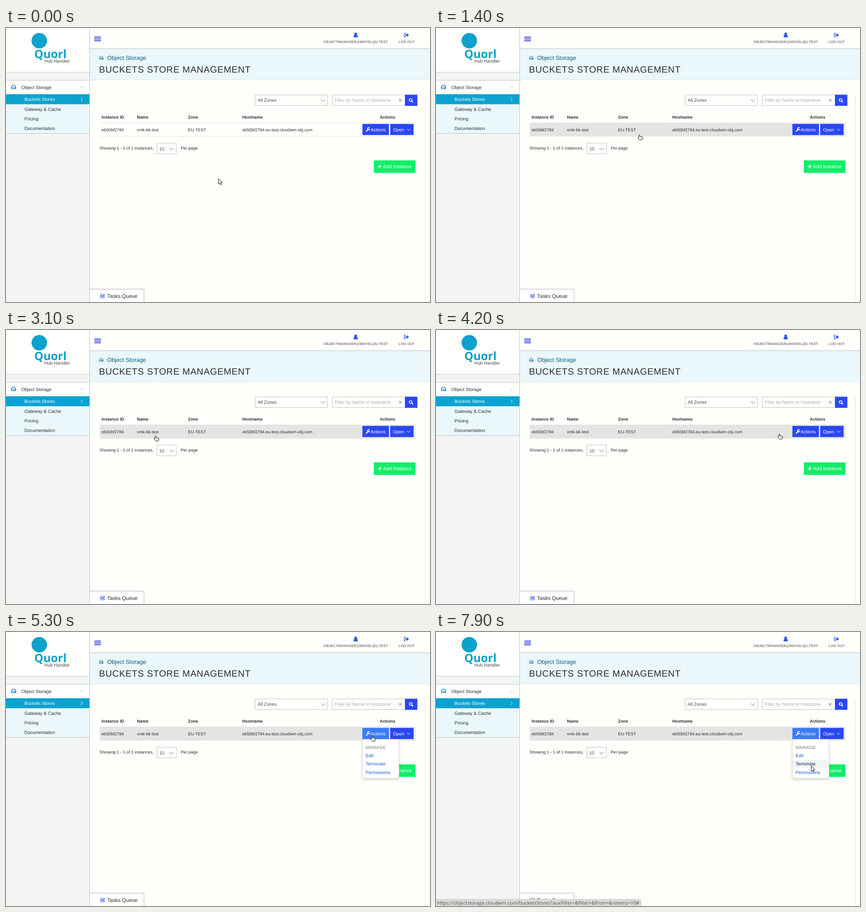
Write an HTML page that moves like this. It is 930 by 602 pixels and loops after 8 s.

```html
<!DOCTYPE html>
<html lang="en">
<head>
<meta charset="utf-8">
<title>Buckets store management</title>
<style>
html, body { margin: 0; width: 100%; height: 100%; overflow: hidden; background: #fffffc; }
svg { display: block; width: 930px; height: 602px; }
text { font: 9.96px "Liberation Sans", Arial, sans-serif; fill: #2b2d31; text-rendering: geometricPrecision; white-space: pre; }
.cell text { font-size: 9.24px; }
.b, .cell text.b { font-weight: bold; }
.top text { font-size: 7.82px; font-weight: bold; fill: #7b7c80; text-anchor: middle; }
text.w { fill: #fff; }
.line { fill: none; stroke: #bcbfc2; }
.soft { fill: none; stroke: #e0e3e3; }
.chev { fill: none; stroke: #4d68c4; stroke-width: 1; }
.menu text { fill: #1f55d0; }
.blue { fill: #2b47f4; }
.icon { fill: #2a55ea; }
</style>
</head>
<body>
<svg viewBox="0 0 930 602">
  <defs>
    <filter id="shadow" x="-20%" y="-20%" width="140%" height="140%">
      <feDropShadow dx="0" dy="3" stdDeviation="3" flood-opacity=".17"/>
    </filter>
    <g id="disk" fill="none" stroke-width="1.2">
      <path d="M.6 5L2.4 1.2Q2.6.6 3.3.6H7.7Q8.4.6 8.6 1.2L10.4 5V8.4H.6ZM.6 5H10.4M6.2 6.8H7.3M8.2 6.8H9.3"/>
    </g>
  </defs>
  <rect width="930" height="602" fill="#fffffc"/>

  <!-- sidebar -->
  <rect width="183" height="602" fill="#f3f5f4"/>
  <rect width="183" height="97" fill="#fffffe"/>
  <circle cx="73" cy="28" r="17" fill="#0ba2cb"/>
  <text x="62" y="66" style="font:bold 25px 'Open Sans',sans-serif;fill:#0b9fc9">Quorl</text>
  <text x="84" y="75.5" style="font-size:10px;fill:#45484c">Hub Handler</text>
  <rect y="115" width="183" height="31" fill="#fffffd"/>
  <rect y="146" width="183" height="85" fill="#eaf8fc"/>
  <rect y="145.5" width="183.5" height="22" fill="#0ca2d0"/>
  <path class="line" d="M0 97.2H183M0 115H183M0 231.7H183M183.5 0V602"/>
  <use href="#disk" x="11" y="125" stroke="#136fb0"/>
  <text x="33.5" y="133.8">Object Storage</text>
  <path class="chev" style="stroke:#bcc3c6" d="M162 128L166 132L170 128"/>
  <text class="w" x="40.5" y="160.2">Buckets Stores</text>
  <path class="chev" style="stroke:#fff" d="M164 153L167.5 156.7L164 160.4"/>
  <text x="40.5" y="181.6">Gateway &amp; Cache</text>
  <text x="40.5" y="203">Pricing</text>
  <text x="40.5" y="224.3">Documentation</text>

  <!-- top bar -->
  <path d="M193.7 20H208.2M193.7 24H208.2M193.7 28H208.2" stroke="#2a40d6" stroke-width="2"/>
  <g class="top">
    <path class="icon" d="M762.5 20.5V18Q762.7 15.2 765 15H769Q771.3 15.2 771.5 18V20.5Z"/>
    <circle class="icon" cx="767" cy="13" r="3"/>
    <path d="M877 11.5H874.5Q873.5 11.5 873.5 12.5V18.5Q873.5 19.5 874.5 19.5H877" fill="none" stroke="#2a55ea" stroke-width="1.3"/>
    <path class="icon" d="M876 14H879.3V11.3L883.8 15.5L879.3 19.7V17H876Z"/>
    <text x="767" y="33.3">OBJECTMANAGER@MOVELQU.TEST</text>
    <text x="878.7" y="33.3">LOG OUT</text>
  </g>
  <rect x="184" y="46" width="746" height="68" fill="#eaf7fb"/>
  <path class="line" d="M184 45.5H930"/>
  <path class="soft" d="M184 114H930M919.5 147V602"/>
  <use href="#disk" transform="translate(204.5 62) scale(.82)" stroke="#0b6088"/>
  <text x="222" y="69.8" style="font-size:12.8px;fill:#0b5c84">Object Storage</text>
  <text x="204" y="97.6" style="font-size:19.9px;letter-spacing:.711px">BUCKETS STORE MANAGEMENT</text>

  <!-- filters -->
  <path class="line" d="M546.5 147H705.5V170.5H546.5ZM875 147H715.5V170.5H875"/>
  <text x="552" y="162.3" style="fill:#4a4c50">All Zones</text>
  <path class="chev" d="M691 157L695.3 161.5L699.6 157"/>
  <text x="721" y="162.3" style="fill:#a9abad">Filter by Name or hostname</text>
  <path d="M862 156L867.6 161.6M867.6 156L862 161.6" stroke="#888" stroke-width="1.1"/>
  <rect class="blue" x="875" y="146.5" width="27.3" height="24.5"/>
  <path d="M889.6 160.2L892.6 163.2" stroke="#fff" stroke-width="2"/>
  <circle cx="887.6" cy="158.2" r="3" fill="none" stroke="#fff" stroke-width="1.6"/>

  <!-- table -->
  <rect id="row" x="205.5" y="209" width="692.5" height="29" fill="#e4e5e3"/>
  <path class="soft" d="M205 208.5H898M205 238H898"/>
  <g class="cell">
    <text class="b" x="209.7" y="198.7">Instance ID</text>
    <text class="b" x="287.3" y="198.7">Name</text>
    <text class="b" x="399.3" y="198.7">Zone</text>
    <text class="b" x="518.2" y="198.7">Hostname</text>
    <text class="b" x="820" y="198.7">Actions</text>
    <text x="209.7" y="226.5">eb50bf2784</text>
    <text x="287.3" y="226.5">vmk-bk-test</text>
    <text x="399.3" y="226.5">EU-TEST</text>
    <text x="518.2" y="226.5">eb50bf2784.eu-test.cloudwm-obj.com</text>
    <text x="205" y="267">Showing 1 - 1 of 1 instances,</text>
    <text x="383.2" y="267">Per page</text>
  </g>
  <rect id="actions" x="781.7" y="210.7" width="58.2" height="24.5"/>
  <path d="M790.2 227L794.7 222.5" stroke="#fff" stroke-width="2.2" stroke-linecap="round"/>
  <path d="M797.4 219.6A2.5 2.5 0 1 0 798 221.8" fill="none" stroke="#fff" stroke-width="1.9"/>
  <text class="w" x="800" y="226.5">Actions</text>
  <rect class="blue" x="842.7" y="210.7" width="51.3" height="24.5"/>
  <text class="w" x="849" y="226.5">Open</text>
  <path class="chev" style="stroke:#fff" d="M879.5 221.5L883 225L886.5 221.5"/>
  <path class="line" d="M331 253H373.5V276.5H331Z"/>
  <text x="336.3" y="268.5" style="fill:#4a4c50">10</text>
  <path class="chev" d="M358.7 263.5L363 268L367.3 263.5"/>
  <rect x="806.8" y="290.8" width="91.4" height="27.6" fill="#12ee68"/>
  <path d="M815.5 304.3H824M819.7 300V308.6" stroke="#fff" stroke-width="2.2"/>
  <text class="w" x="827.2" y="308.2" style="font-size:10.67px">Add Instance</text>

  <!-- tasks tab -->
  <path d="M184 574H303V602H184Z" fill="#fffffe"/>
  <path class="line" d="M184 573.7H302.7V602" stroke-width="1.2"/>
  <path d="M215.5 589V592Q215.5 593 214.5 593H208.7Q207.7 593 207.7 592V586Q207.7 585 208.7 585H213.5" fill="none" stroke="#2a55ea" stroke-width="1.2"/>
  <path d="M209.5 587.8L211.8 590.2L216.5 585.2" fill="none" stroke="#2a55ea" stroke-width="1.9"/>
  <text x="222" y="593" style="font-size:11.38px">Tasks Queue</text>

  <!-- dropdown -->
  <g id="menu" class="menu">
    <rect x="782" y="236" width="80" height="85" fill="#fffffe" stroke="#c9cbcc" stroke-width=".7" filter="url(#shadow)"/>
    <rect id="hover" x="782.4" width="79.2" height="18.5" fill="#f3f4f3"/>
    <text class="b" x="788.8" y="256.5" style="fill:#a2a4a5">MANAGE</text>
    <text id="edit" x="788.8" y="274.8">Edit</text>
    <text id="terminate" x="788.8" y="293.3">Terminate</text>
    <text x="788.8" y="311.7">Permissions</text>
  </g>

  <!-- link address bar -->
  <g id="status">
    <path id="bar" fill="#dadbd9" stroke="#c8c9c7" stroke-width=".8"/>
    <text id="link" x="2.5" y="598.5" style="font:10.6px 'Open Sans','Noto Sans',sans-serif;fill:#4e5050"></text>
  </g>

  <g stroke="#111" stroke-width="1" stroke-linejoin="round" fill="#fff">
    <path id="arrow" d="M0 0V12L2.8 9.4L4.7 13.7L6.6 12.9L4.7 8.7H8.5Z"/>
    <g id="hand">
      <path d="M3 6.8V1.7Q3 .6 4 .6T5.1 1.7V4.4L10 5.2Q11.5 5.5 11.4 6.9L11 9.2L10.2 11.8H4.5L.8 7.7Q.2 6.7 1.1 6.2Q1.9 5.9 3 6.8Z"/>
      <path d="M5.6 7.4V8.4M7.4 7.4V8.4M9.2 7.4V8.4" stroke-width=".7"/>
    </g>
  </g>
</svg>
<script>
const LOOP = 8000, STEP = 100;
const URL_TEXT = 'https://objectstorage.cloudwm.com/bucketsStores?auxFilter=&filter=&from=&nItems=10#';
const $ = id => document.getElementById(id);

// pointer path: time, x, y
const path = [
  [1000, 466, 331], [1100, 464, 320], [1300, 451, 251], [1400, 442, 234], [1500, 442, 233],
  [1800, 442, 233], [1900, 435, 233], [2400, 304, 233], [2500, 298, 233], [2700, 312, 233],
  [3000, 323, 232.5], [3100, 324, 232], [3300, 324, 232], [3400, 332, 233], [3800, 540, 234],
  [4100, 735, 229], [4200, 749, 228], [4500, 781, 228], [4800, 799, 228], [5600, 799, 228],
  [5700, 801, 243], [5800, 801, 243], [6000, 808, 271], [6100, 808, 271], [6300, 867, 284],
  [6500, 822, 293], [6600, 812.5, 293], [6800, 812.5, 293], [7200, 829, 297],
  [7600, 821, 299], [7700, 821, 299], [7800, 823, 295], [7900, 823, 294]
];

const clamp = v => Math.max(0, Math.min(1, v));
const ramp = (t, a, b) => clamp((t - a) / (b - a));
const show = (id, on) => $(id).style.display = on ? '' : 'none';

function pointerAt(t) {
  const i = path.findIndex(p => p[0] >= t);
  if (i < 0) return path[path.length - 1].slice(1);
  if (i === 0) return path[0].slice(1);
  const [a, b] = [path[i - 1], path[i]], k = ramp(t, a[0], b[0]);
  return [1, 2].map(n => a[n] + (b[n] - a[n]) * k);
}

function draw(time) {
  const t = Math.floor(time % LOOP / STEP) * STEP;
  const [x, y] = pointerAt(t);
  const pressed = t >= 7800, isArrow = t < 1400 || pressed;

  for (const id of ['arrow', 'hand']) $(id).setAttribute('transform', `translate(${x} ${y})`);
  show('arrow', isArrow);
  show('hand', !isArrow);

  show('row', t >= 1400);
  $('actions').setAttribute('fill', t >= 4500 ? '#3a7bf7' : '#2b47f4');

  const open = t >= 5200, inside = open && x < 858;
  const onEdit = inside && y >= 260 && y < 280, onTerminate = inside && y >= 280;
  show('menu', open);
  show('hover', onEdit || onTerminate);
  $('hover').setAttribute('y', onEdit ? 262 : 280.5);
  $('edit').style.fill = onEdit ? '#14347e' : '';
  $('terminate').style.fill = pressed ? '#101f4c' : '';

  const grow = ramp(t, 7300, 7600), width = 308 + 142 * grow;
  $('status').setAttribute('opacity', ramp(t, 6500, 6700));
  $('bar').setAttribute('d', `M-1 587H${width - 3}Q${width} 587 ${width} 590V603H-1Z`);
  $('link').textContent = grow < 1 ? URL_TEXT.slice(0, 55 + Math.floor(28 * grow)) + '...' : URL_TEXT;
}

const start = performance.now();
function tick() {
  draw(performance.now() - start);
  requestAnimationFrame(tick);
}
tick();
</script>
</body>
</html>
```
